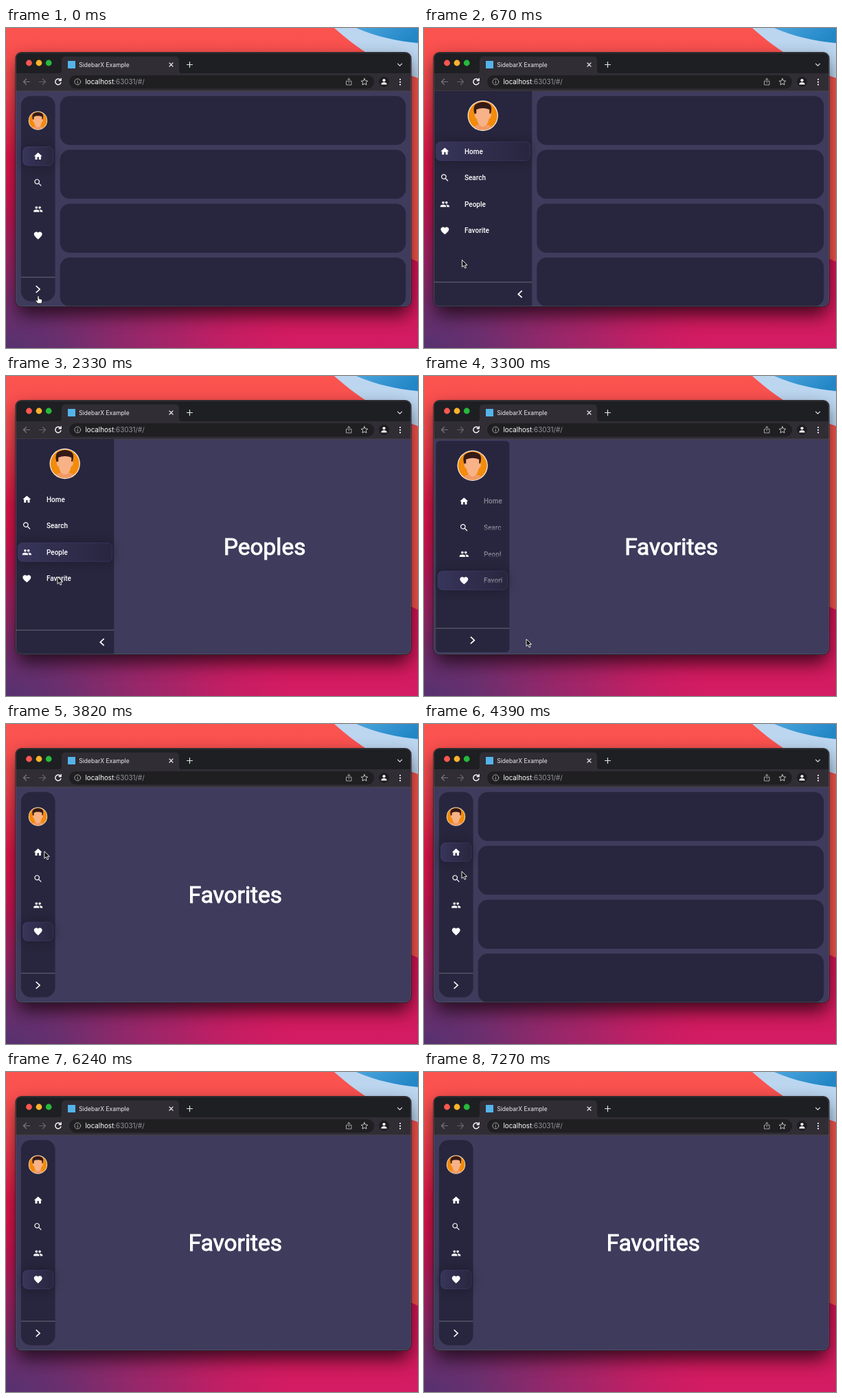
Write an HTML page that moves like this. It is 600 by 467 pixels and loops after 7300 ms.

```html
<!DOCTYPE html>
<html lang="en">
<head>
<meta charset="utf-8">
<title>Sidebar demo</title>
<style>
html, body { margin: 0; width: 100%; height: 100%; overflow: hidden; background: #d8184f; }
svg { display: block; width: 100vw; height: 100vh; }
.chrome { font-family: Inter, "Liberation Sans", sans-serif; }
.app { font-family: Roboto, "Liberation Sans", sans-serif; fill: #fff; }
.line { fill: none; stroke-linecap: round; stroke-linejoin: round; }
</style>
</head>
<body>
<svg viewBox="0 0 600 467">
  <defs>
    <linearGradient id="sky" x2="0" y2="1">
      <stop offset="0" stop-color="#fb544f"/><stop offset=".17" stop-color="#f64a4e"/>
      <stop offset=".4" stop-color="#e0164a"/><stop offset=".6" stop-color="#d20f4b"/>
      <stop offset=".85" stop-color="#d3195b"/><stop offset="1" stop-color="#d21c63"/>
    </linearGradient>
    <radialGradient id="dusk" gradientUnits="userSpaceOnUse" cx="0" cy="467" r="420" gradientTransform="translate(0 186.8) scale(1 .6)">
      <stop offset="0" stop-color="#56316f"/><stop offset=".2" stop-color="#65306f" stop-opacity=".95"/>
      <stop offset=".6" stop-color="#8d296b" stop-opacity=".6"/><stop offset="1" stop-color="#c01c64" stop-opacity="0"/>
    </radialGradient>
    <linearGradient id="ocean" x2="1" y2=".3">
      <stop offset="0" stop-color="#4aa5dc"/><stop offset="1" stop-color="#2387c7"/>
    </linearGradient>
    <linearGradient id="selected">
      <stop offset="0" stop-color="#37355a"/><stop offset="1" stop-color="#28263e"/>
    </linearGradient>
    <linearGradient id="cutoff" x2="0" y2="1">
      <stop offset=".5" stop-color="#fff"/><stop offset="1" stop-color="#fff" stop-opacity="0"/>
    </linearGradient>
    <filter id="windowShadow" x="-20%" y="-20%" width="140%" height="150%"><feGaussianBlur stdDeviation="13"/></filter>
    <filter id="itemShadow" x="-60%" y="-150%" width="220%" height="400%"><feGaussianBlur stdDeviation="8"/></filter>
    <clipPath id="windowClip"><rect x="14.5" y="36" width="575" height="370" rx="8"/></clipPath>
    <clipPath id="face"><circle r="21"/></clipPath>
  </defs>

  <rect width="600" height="467" fill="url(#sky)"/>
  <rect width="600" height="467" fill="url(#dusk)"/>
  <path d="M478 0C505 24 550 58 600 73V0Z" fill="#bcd6f0"/>
  <path d="M510 0C540 13 570 19 600 22V0Z" fill="url(#ocean)"/>
  <path d="M560 73H600V341C588 336 574 330 560 320Z" fill="#f4554c"/>

  <rect x="16" y="48" width="572" height="371" rx="10" filter="url(#windowShadow)" opacity=".68"/>
  <rect x="13.5" y="35" width="577" height="372" rx="9" fill="#151318"/>

  <g clip-path="url(#windowClip)">
    <rect x="14" y="36" width="576" height="31" fill="#1e1f22"/>
    <path d="M76 67Q81 66 81 61V47Q81 41.5 87 41.5H246Q252 41.5 252 47V61Q252 66 257 67Z" fill="#302d35"/>
    <rect x="14" y="66" width="576" height="26" fill="#302d35"/>
    <rect x="92" y="69" width="444" height="19.5" rx="9.7" fill="#1f1f22"/>
    <circle cx="33.5" cy="51" r="4.4" fill="#fc5750"/>
    <circle cx="48" cy="51" r="4.4" fill="#f9b42c"/>
    <circle cx="62.2" cy="51" r="4.4" fill="#27b93c"/>
    <rect x="90" y="48" width="11" height="11" fill="#54b4ea"/>
    <g class="chrome">
      <text x="106.3" y="56.6" font-size="8.5" fill="#eeeef0">SidebarX Example</text>
      <text x="115.4" y="82.1" font-size="9.8" fill="#fff">localhost<tspan fill="#96969b">:63031/#/</tspan></text>
    </g>
    <g class="line" stroke="#e4e4e6" stroke-width="1.2">
      <path d="M238 51l5 5m0-5l-5 5M263.5 53.5h8m-4-4v8M570.5 52.2l3 3 3-3"/>
      <path d="M34.5 78.5h-9m4-4l-4 4 4 4" stroke="#78777c"/>
      <path d="M48.5 78.5h9m-4-4l4 4-4 4" stroke="#66656a"/>
      <path d="M79.4 76A4.2 4.2 0 1 0 80 79.8M80.2 73.8v3h-3" stroke="#fff" stroke-width="1.4"/>
      <g stroke="#a5a5a9" stroke-width="1">
        <circle cx="104.3" cy="78.5" r="4.4"/><path d="M104.3 78v2.8M104.3 76.2v.1"/>
        <path d="M497.5 77.5h-2v5.5h7.5v-5.5h-2M499.3 80v-6.2m-2 1.8l2-2 2 2"/>
      </g>
      <path d="M522 73.8l1.4 3.1 3.4.4-2.5 2.3.7 3.4-3-1.7-3 1.7.7-3.4-2.5-2.3 3.4-.4Z" stroke="#c6c6c9" stroke-width="1"/>
    </g>
    <circle cx="550.5" cy="78.5" r="7.4" fill="#1d1d20"/>
    <g fill="#fff">
      <circle cx="550.5" cy="76.3" r="2.1"/><path d="M546.3 82.6Q546.5 79.3 550.5 79.3T554.7 82.6Z"/>
      <circle cx="574" cy="75" r="1.1"/><circle cx="574" cy="78.8" r="1.1"/><circle cx="574" cy="82.6" r="1.1"/>
    </g>
    <rect x="14" y="92" width="576" height="314" fill="#3e3b5c"/>
    <path d="M14 91.9H590" stroke="#4c4849" stroke-width=".8"/>

    <g class="app">
      <g id="cards" fill="#28263e"></g>
      <text id="title" y="261.3" font-size="33.4" text-anchor="middle" stroke="#fff" stroke-width="1"></text>
      <rect id="sidebar" fill="#28263e"/>
      <rect id="glow" height="28" rx="7" filter="url(#itemShadow)" fill="#000" opacity=".3"/>
      <rect id="pill" height="27.4" rx="7" fill="url(#selected)" stroke="#5f5fa7" stroke-opacity=".37" stroke-width=".8"/>
      <g id="avatar">
        <circle r="22.2" fill="#f6efe8"/>
        <g clip-path="url(#face)">
          <rect x="-22" y="-22" width="44" height="44" fill="#f38b0b"/>
          <path d="M-17 24Q-15 15 -6 13V8H6V13Q15 15 17 24Z" fill="#f19a63"/>
          <path d="M-12 -2Q-16 -15 -8 -18Q0 -22 8 -18Q15 -15 11 -2Z" fill="#351a16"/>
          <path d="M-9.5 -9Q0 -13 9.5 -9V-3Q13 -4 12 0Q11 4 9 4Q7 15 0 16Q-7 15 -9 4Q-11 4 -12 0Q-13 -4 -9.5 -3Z" fill="#f8b288"/>
        </g>
      </g>
      <g id="items"></g>
      <path id="divider" stroke="#fff" stroke-opacity=".34" stroke-width=".9"/>
      <path id="chevron" class="line" d="M-2.7 -5L2.7 0L-2.7 5" stroke="#fff" stroke-width="1.7" style="stroke-linecap:butt;stroke-linejoin:miter"/>
    </g>
  </g>
  <rect x="14.5" y="36" width="575" height="370" rx="8" fill="none" stroke="#a09ca8" stroke-opacity=".4" stroke-width=".8"/>

  <path id="arrow" d="M0 0V10.4L2.4 8.2 4.1 12 6 11.2 4.3 7.5H7.6Z" fill="#111" stroke="#fff" stroke-width=".9" stroke-linejoin="round"/>
  <path id="hand" d="M-1.2 .6Q0 -1 1.2 .6V4L5 5Q6 5.3 5.8 7L5 11H-1L-4 7Q-4.4 5.6 -3 5.8L-1.2 7Z" fill="#fff" stroke="#111" stroke-width=".9" stroke-linejoin="round"/>
</svg>
<script>
const LOOP = 7300, SLIDE = 300, UNIT = .715;
const OPEN_AT = 250, CLOSE_AT = 3186;
const HOME = 0, SEARCH = 1, PEOPLE = 2, FAVORITE = 3;

const pages = [
  { label: "Home", title: "", icon: "M10 20v-6h4v6h5v-8h3L12 3 2 12h3v8z" },
  { label: "Search", title: "Search", icon: "M15.5 14h-.79l-.28-.27C15.41 12.59 16 11.11 16 9.5 16 5.91 13.09 3 9.5 3S3 5.91 3 9.5 5.91 16 9.5 16c1.61 0 3.09-.59 4.23-1.57l.27.28v.79l5 4.99L20.49 19l-4.99-5zm-6 0C7.01 14 5 11.99 5 9.5S7.01 5 9.5 5 14 7.01 14 9.5 11.99 14 9.5 14z" },
  { label: "People", title: "Peoples", icon: "M16 11c1.66 0 3-1.34 3-3s-1.34-3-3-3-3 1.34-3 3 1.34 3 3 3zm-8 0c1.66 0 3-1.34 3-3S9.66 5 8 5 5 6.34 5 8s1.34 3 3 3zm0 2c-2.33 0-7 1.17-7 3.5V19h14v-2.5c0-2.33-4.67-3.5-7-3.5zm8 0c-.29 0-.62.02-.97.05 1.16.84 1.97 1.97 1.97 3.45V19h6v-2.5c0-2.33-4.67-3.5-7-3.5z" },
  { label: "Favorite", title: "Favorites", icon: "M12 21.35l-1.45-1.32C5.4 15.36 2 12.28 2 8.5 2 5.42 4.42 3 7.5 3c1.74 0 3.41.81 4.5 2.09C13.09 3.81 14.76 3 16.5 3 19.58 3 22 5.42 22 8.5c0 3.78-3.4 6.86-8.55 11.54L12 21.35z" }
];

// [time, page]
const clicks = [
  [0, HOME], [1200, SEARCH], [1950, PEOPLE], [2450, FAVORITE],
  [3950, HOME], [4560, SEARCH], [4960, PEOPLE], [5420, FAVORITE]
];

// [time, x, y] of the pointer tip
const pointer = [
  [0, 47, 391], [450, 47, 391], [1050, 74.5, 220], [1500, 74.5, 220],
  [1850, 75, 257], [2100, 75, 257], [2330, 75, 293], [2650, 75, 294],
  [3050, 149, 384], [3330, 149, 384], [3850, 55, 184], [4150, 55, 184],
  [4390, 55, 215], [4620, 56, 224], [4900, 56, 258], [5060, 56, 258],
  [5270, 56, 286], [5420, 56, 299], [5800, 56, 301], [6300, 56, 480], [7300, 56, 480]
];

const $ = id => document.getElementById(id);
const clamp = v => Math.min(1, Math.max(0, v));
const mix = (a, b, k) => a + (b - a) * k;
const smooth = k => k * k * (3 - 2 * k);
const set = (el, attrs) => { for (const k in attrs) el.setAttribute(k, attrs[k]); };
function add(parent, tag, attrs) {
  const el = document.createElementNS("http://www.w3.org/2000/svg", tag);
  set(el, attrs);
  return parent.appendChild(el);
}

// cubic-bezier(.42, 0, 1, 1)
function easeIn(x) {
  let lo = 0, hi = 1;
  for (let i = 0; i < 18; i++) {
    const s = (lo + hi) / 2, r = 1 - s;
    if (1.26 * r * r * s + 3 * r * s * s + s ** 3 < x) lo = s; else hi = s;
  }
  return 3 * lo * lo - 2 * lo ** 3;
}

const cards = [0, 1, 2, 3].map(i =>
  add($("cards"), "rect", { y: 99.2 + i * 78.6, height: 71.5, rx: 14.3 }));

const items = pages.map(page => {
  const text = add($("items"), "text", { "font-size": 10, "font-weight": 500 });
  return { page, text, icon: add($("items"), "path", { d: page.icon }) };
});

const ruler = document.createElement("canvas").getContext("2d");
function fit(label, width) {
  ruler.font = '500 10px Roboto, "Liberation Sans", sans-serif';
  let n = label.length;
  while (n > 0 && ruler.measureText(label.slice(0, n)).width > width) n--;
  return label.slice(0, n);
}

function drawItems(left, top, width, open) {
  const fade = easeIn(open), spacer = Math.floor((1 - fade) * 6 + 1e-6);
  const size = 20 * UNIT, pad = 8.5;
  const free = width - 2 * pad - size;
  const iconX = left + pad + free * spacer / (spacer + 6);
  const textX = iconX + size + 30 * UNIT;
  const room = free * 6 / (spacer + 6) - 30 * UNIT;
  items.forEach(({ page, text, icon }, i) => {
    const y = top + 88 + i * 38.6;
    set(icon, { transform: `translate(${iconX} ${y - size / 2}) scale(${size / 24})` });
    const shown = fit(page.label, room);
    text.textContent = shown;
    set(text, { x: textX, y: y + 3.6, opacity: fade, fill: shown === page.label ? "#fff" : "url(#cutoff)" });
  });
}

function drawPointer(t, left, right, footer) {
  const i = Math.max(1, pointer.findIndex(p => p[0] > t));
  const [t0, x0, y0] = pointer[i - 1], [t1, x1, y1] = pointer[i];
  const k = smooth(clamp((t - t0) / (t1 - t0)));
  const x = mix(x0, x1, k), y = mix(y0, y1, k);
  const overToggle = x > left && x < right && y > footer && y < 406;
  const transform = `translate(${x} ${y})`;
  set($("arrow"), { transform, visibility: overToggle ? "hidden" : "visible" });
  set($("hand"), { transform, visibility: overToggle ? "visible" : "hidden" });
}

function draw(t) {
  const extended = t >= OPEN_AT && t < CLOSE_AT;
  const open = clamp((t - OPEN_AT) / SLIDE) - clamp((t - CLOSE_AT) / SLIDE);
  const margin = 10 * UNIT * (1 - open);
  const left = 14.7 + margin, top = 92 + margin, bottom = 405.8 - margin;
  const width = mix(49.7, 142.5, open), right = left + width, middle = left + width / 2;
  const footer = bottom - 34.9;

  const current = clicks.filter(c => c[0] <= t).pop()[1];
  const bodyX = right + 10 * UNIT;
  set($("cards"), { visibility: current === HOME ? "visible" : "hidden" });
  cards.forEach(card => set(card, { x: bodyX, width: 582.2 - bodyX }));
  $("title").textContent = pages[current].title;
  set($("title"), { x: (bodyX + 589) / 2 });

  set($("sidebar"), { x: left, y: top, width, height: bottom - top, rx: margin * 2 });
  const pill = { x: left + 2.6, y: top + 74.2 + current * 38.6, width: width - 5.4 };
  set($("pill"), pill);
  set($("glow"), pill);

  const radius = Math.min((width - 22.3) / 2, 22.2);
  set($("avatar"), { transform: `translate(${middle - .2} ${top + 36}) scale(${radius / 22.2})` });
  drawItems(left, top, width, open);

  set($("divider"), { d: `M${left} ${footer}H${right}` });
  const chevronX = extended ? right - 17.2 : middle - .3;
  set($("chevron"), { transform: `translate(${chevronX} ${bottom - 17.4}) scale(${extended ? -1 : 1} 1)` });
  drawPointer(t, left, right, footer);
}

const start = performance.now();
function tick() {
  draw((performance.now() - start) % LOOP);
  requestAnimationFrame(tick);
}
tick();
</script>
</body>
</html>
```
